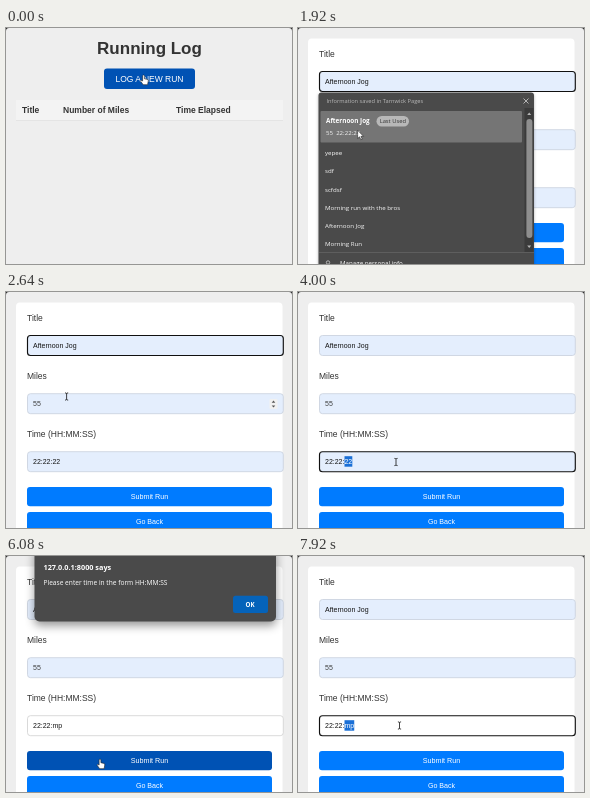
Recreate the animation shown at these times as an HTML page. Size 286 by 236 pixels, loop 8 s.

```html
<!DOCTYPE html>
<html lang="en">
<head>
<meta charset="utf-8">
<title>Running Log</title>
<style>
  html, body { margin: 0; width: 100%; height: 100%; overflow: hidden; background: #eeeeee; }
  svg { display: block; width: 286px; height: 236px; }
  text { font-family: "Liberation Sans", Arial, sans-serif; white-space: pre; }
  .ui text { font-family: "Open Sans", "Noto Sans", sans-serif; }
  .soft { filter: drop-shadow(0 1px 1.5px rgba(0, 0, 0, .3)); }
  .deep { filter: drop-shadow(0 4px 5px rgba(0, 0, 0, .42)); }
</style>
</head>
<body>
<svg id="stage" viewBox="0 0 286 236" xmlns="http://www.w3.org/2000/svg"></svg>
<script>
const NS = 'http://www.w3.org/2000/svg';
const LOOP = 8000, STEP = 80;
const BLUE = '#007bff', DEEP = '#0052b4', FILL = '#e4eefd', INK = '#333333', TYPED = '#151515';
const stage = document.getElementById('stage');

function add(parent, tag, attrs = {}, content) {
  const el = document.createElementNS(NS, tag);
  set(el, attrs);
  if (content !== undefined) el.textContent = content;
  parent.appendChild(el);
  return el;
}
function set(el, attrs) {
  for (const k in attrs) el.setAttribute(k, attrs[k]);
}
const group = (parent, cls = '') => add(parent, 'g', { class: cls });
const box = (parent, x, y, width, height, fill, rx = 0, more = {}) =>
  add(parent, 'rect', { x, y, width, height, fill, rx, ...more });
const label = (parent, x, y, size, fill, content, more = {}) =>
  add(parent, 'text', { x, y, 'font-size': size, fill, ...more }, content);
const path = (parent, d, more) => add(parent, 'path', { d, fill: 'none', ...more });
const show = (el, on) => el.setAttribute('display', on ? 'inline' : 'none');
const bold = { 'font-weight': 700 };
const middle = { 'text-anchor': 'middle' };

box(stage, 0, 0, 286, 236, '#eeeeee');

// List page
const list = group(stage);
label(list, 143.5, 26, 17, INK, 'Running Log', { ...bold, ...middle });
box(list, 98, 40.5, 91, 20.5, DEEP, 3);
label(list, 143.5, 53.8, 8.5, '#ffffff', 'LOG A NEW RUN', middle);
box(list, 10, 72, 267, 20, '#f3f3f3');
box(list, 10, 92, 267, 0.7, '#e0e0e0');
[[16, 'Title'], [57, 'Number of Miles'], [170, 'Time Elapsed']]
  .forEach(([x, name]) => label(list, x, 85, 8.5, INK, name, bold));

// Form page
const form = group(stage);
box(form, 10, 10.5, 266.5, 240, '#ffffff', 4);
const fields = [['Title', 43.5], ['Miles', 101.7], ['Time (HH:MM:SS)', 159.7]].map(([name, y]) => {
  label(form, 21, y - 14.9, 8.5, INK, name);
  return {
    y,
    frame: box(form, 21.5, y, 255.8, 20, '#ffffff', 3),
    mark: box(form, 46.5, y + 4.5, 0, 10.5, '#1a6fd6'),
    value: label(form, 27, y + 12.4, 7, TYPED, ''),
    caret: box(form, 0, y + 5, 0.6, 9.5, '#111111')
  };
});
const [title, miles, time] = fields;
const valueHead = add(time.value, 'tspan');
const valueTail = add(time.value, 'tspan');
miles.value.setAttribute('fill', '#3c3c3c');

const spinner = group(form);
box(spinner, 263.5, 107, 8, 10, '#f1f1f1', 1);
path(spinner, 'M265.7 110.8l1.8-2.2 1.8 2.2zM265.7 113.4l1.8 2.2 1.8-2.2z', { fill: '#555555' });

const submit = box(form, 21, 195, 245, 19.2, BLUE, 3);
label(form, 143.5, 207.2, 7.2, '#ffffff', 'Submit Run', middle);
box(form, 21, 220, 245, 19.2, BLUE, 3);
label(form, 143.5, 232, 7.1, '#ffffff', 'Go Back', middle);

// Saved-entry popup
const popup = group(stage, 'ui');
box(popup, 20.5, 64.5, 215.5, 190, '#4a4a4a', 3, { class: 'soft' });
label(popup, 28.5, 75.2, 5.7, '#b9b9b9', 'Information saved in Tarnwick Pages');
path(popup, 'M225.5 70.5l5 5m0-5l-5 5', { stroke: '#d0d0d0', 'stroke-width': 0.8 });
const row = box(popup, 22.5, 83, 201.5, 31.5, '#757575', 1);
label(popup, 28, 95.3, 6.35, '#ffffff', 'Afternoon Jog', bold);
box(popup, 78.5, 88, 32.5, 10.5, '#b8b8b8', 5.2);
label(popup, 94.8, 95.4, 5.8, '#333333', 'Last Used', middle);
label(popup, 28, 107, 6.1, '#f5f5f5', '55  22:22:22');
['yepee', 'sdf', 'scfdsf', 'Morning run with the bros', 'Afternoon Jog', 'Morning Run']
  .forEach((name, i) => label(popup, 27, 127.2 + i * 18.25, 6.15, '#f8f8f8', name));
box(popup, 226.5, 80, 9, 144, '#3b3b3b');
box(popup, 228.4, 91, 6, 119, '#8e8e8e', 3);
path(popup, 'M229.2 87l2-2.6 2 2.6zM229.2 217.5l2 2.6 2-2.6z', { fill: '#b5b5b5' });
box(popup, 21, 224, 215, 0.7, '#676767');
add(popup, 'circle', { cx: 30, cy: 234.5, r: 1.7, fill: 'none', stroke: '#dddddd', 'stroke-width': 0.7 });
label(popup, 42, 237.5, 6.2, '#f8f8f8', 'Manage personal info');

// Alert
const alertBox = group(stage, 'ui');
box(alertBox, 28.5, -10, 241.5, 75.5, '#4a4a4a', 5, { class: 'deep' });
label(alertBox, 37.5, 14.2, 7.3, '#ffffff', '127.0.0.1:8000 says', bold);
label(alertBox, 37.5, 29.4, 6.62, '#ffffff', 'Please enter time in the form HH:MM:SS');
box(alertBox, 227, 39.8, 35, 17.2, '#0563ba', 2.5);
label(alertBox, 244, 50.5, 6.2, '#ffffff', 'OK', { ...bold, ...middle });

// Dark window corners
path(stage, 'M0 0h3q-3 0-3 3zM286 0h-3q3 0 3 3z', { fill: '#222222' });

// Pointers, each with its hot spot at the origin
const pointers = {
  arrow: group(stage),
  text: group(stage),
  hand: group(stage)
};
path(pointers.arrow, 'M0 0v8.2l1.9-1.7 1.3 2.9 1.4-.6-1.3-2.8h2.6z',
  { fill: '#ffffff', stroke: '#222222', 'stroke-width': 0.6 });
path(pointers.text, 'M-1.6-3.6q1.6 0 1.6.7v5.8q0 .7-1.6.7M1.6-3.6q-1.6 0-1.6.7M1.6 3.6q-1.6 0-1.6-.7',
  { stroke: '#111111', 'stroke-width': 0.8 });
path(pointers.hand, 'M-.9.7q.9-1.5 1.8 0v3l3 .7q1 .3.9 1.4l-.7 3.9h-4.4l-2.7-3.6q.3-1.4 2.1-.1z',
  { fill: '#ffffff', stroke: '#222222', 'stroke-width': 0.6 });

// Pointer route: time, x, y
const route = [
  [0, 137.5, 47], [560, 137.5, 47], [960, 131, 52], [1280, 131, 52], [1760, 59.5, 102],
  [2480, 60.6, 104.5], [2720, 60.6, 104.5], [3120, 98, 170], [4960, 98, 170], [5360, 87, 194],
  [5600, 94, 203], [6240, 94, 203], [6800, 243, 49], [7200, 243, 49],
  [7600, 101.5, 169.5], [8000, 101.5, 169.5]
];
function pointerAt(t) {
  const i = Math.max(1, route.findIndex(p => p[0] > t));
  const [t0, x0, y0] = route[i - 1], [t1, x1, y1] = route[i];
  const k = (t - t0) / (t1 - t0), e = k * k * (3 - 2 * k);
  return [x0 + (x1 - x0) * e, y0 + (y1 - y0) * e];
}

// Seconds after the colon are picked by double click, then typed over
const edits = [[0, '22:22:22'], [4160, '22:22:m'], [4400, '22:22:mp']];
const within = (t, a, b) => t >= a && t < b;

function draw(t) {
  const [x, y] = pointerAt(t);
  const onForm = t >= 480;
  const popupOpen = within(t, 1280, 2320);
  const preview = t >= 1680;
  const alertOpen = within(t, 5760, 7200);
  const picked = within(t, 3360, 4160) || t >= 7760;
  const [editTime, value] = edits.filter(e => e[0] <= t).pop();
  const inForm = x > 21 && x < 277;
  const overField = fields.find(f => inForm && within(y, f.y, f.y + 20));
  const overSubmit = alertOpen || (x < 266 && within(y, 195, 214.5));

  show(list, !onForm);
  show(form, onForm);
  show(popup, popupOpen);
  show(alertBox, alertOpen);
  show(row, preview);
  show(spinner, preview && !popupOpen && !alertOpen && overField === miles);

  let focused = null;
  if (within(t, 1200, 3200)) focused = title;
  else if (within(t, 3200, 5680) || t >= 7600) focused = time;

  for (const f of fields) {
    const filled = preview && !(f === time && t >= 4160);
    const on = f === focused;
    set(f.frame, {
      fill: filled ? FILL : '#ffffff',
      stroke: on ? '#101010' : filled ? '#c8d0dc' : '#d0d0d0',
      'stroke-width': on ? 1.15 : 0.8
    });
    show(f.caret, false);
  }
  title.value.textContent = preview ? 'Afternoon Jog' : '';
  miles.value.textContent = preview ? '55' : '';

  const text = preview ? value : '';
  valueHead.textContent = text.slice(0, 6);
  valueTail.textContent = text.slice(6);
  valueTail.setAttribute('fill', picked ? '#ffffff' : TYPED);
  time.mark.setAttribute('width', picked ? valueTail.getComputedTextLength() : 0);

  if (focused === time && !picked) {
    const since = t - (t >= 7600 ? 7600 : Math.max(3200, editTime));
    time.caret.setAttribute('x', 27.2 + time.value.getComputedTextLength());
    show(time.caret, since % 1060 < 530);
  }

  submit.setAttribute('fill', overSubmit ? DEEP : BLUE);

  let kind = 'arrow';
  if (!onForm) kind = 'hand';
  else if (popupOpen && y > 64) kind = 'arrow';
  else if (alertOpen) kind = y > 195 ? 'hand' : 'arrow';
  else if (overSubmit) kind = 'hand';
  else if (overField) kind = 'text';
  for (const k in pointers) show(pointers[k], k === kind);
  pointers[kind].setAttribute('transform', `translate(${x} ${y})`);
}

const start = performance.now();
function tick() {
  const t = (performance.now() - start) % LOOP;
  draw(Math.floor(t / STEP) * STEP);
  requestAnimationFrame(tick);
}
tick();
</script>
</body>
</html>
```
